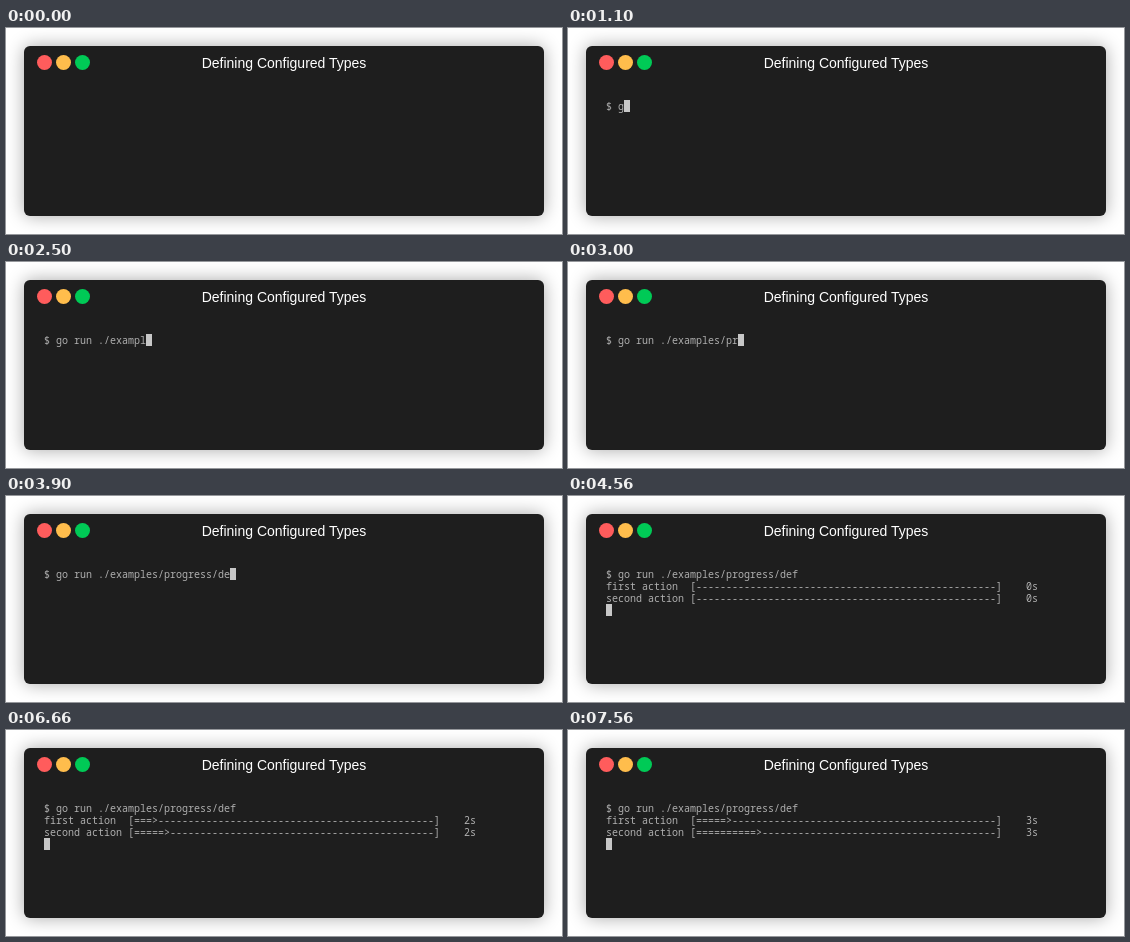
Animation of 556 by 206 pixels, one loop 8000 ms. Source, as an HTML page:

```html
<!DOCTYPE html>
<html lang="en">
<head>
<meta charset="utf-8">
<title>Terminal</title>
<style>
html, body { margin: 0; width: 100%; height: 100%; overflow: hidden; background: #fff; }
svg { display: block; width: 556px; height: 206px; }
.title { font: 14px "Liberation Sans", Arial, sans-serif; fill: #fff; text-anchor: middle; }
.line { font: 10px "Noto Sans Mono", "DejaVu Sans Mono", monospace; fill: #afafaf; white-space: pre; font-variant-ligatures: none; }
</style>
</head>
<body>
<svg viewBox="0 0 556 206">
  <defs>
    <filter id="blur" filterUnits="userSpaceOnUse" x="-30" y="-30" width="616" height="266" color-interpolation-filters="sRGB">
      <feGaussianBlur stdDeviation="9"/>
    </filter>
  </defs>
  <rect x="18" y="18" width="520" height="170" rx="6" fill="#000" opacity=".34" filter="url(#blur)"/>
  <rect x="18" y="18" width="520" height="170" rx="6" fill="#1e1e1e"/>
  <circle cx="38.5" cy="34.5" r="7.5" fill="#ff5c5c"/>
  <circle cx="57.5" cy="34.5" r="7.5" fill="#ffbd4c"/>
  <circle cx="76.5" cy="34.5" r="7.5" fill="#00ca56"/>
  <text class="title" x="278" y="40">Defining Configured Types</text>
  <text class="line" x="38" y="82"></text>
  <text class="line" x="38" y="94"></text>
  <text class="line" x="38" y="106"></text>
  <rect id="cursor" width="6" height="12" fill="#c7c7c7"/>
</svg>
<script>
const LOOP = 8000, CELL = 6, ROW = 12, LEFT = 38, TOP = 72, BAR = 50;
const COMMAND = "go run ./examples/progress/def";
const PAUSES = [1300, 1900, 3100];   // screen skips one refresh here
const PROMPT_AT = 100, ENTER_AT = 4100, BARS_AT = 4560;
const SECONDS = [5560, 6660, 7560];
const FIRST = [5860, 7360];
const SECOND = [5660, 6660, 7060, 7560];

const lines = [...document.querySelectorAll(".line")];
const cursor = document.getElementById("cursor");

const passed = (times, t) => times.filter(at => t >= at).length;

function typed(t) {
  const tick = Math.floor(t / 100) * 100;
  const shown = PAUSES.includes(tick) ? tick - 100 : tick;
  return COMMAND.slice(0, Math.max(0, (shown - 1000) / 100));
}

// Each step adds 5 % on top of an initial 1 %.
function bar(label, steps, t) {
  const full = Math.floor(BAR * (1 + 5 * passed(steps, t)) / 100);
  const done = full ? "=".repeat(full) + ">" : "";
  return `${label.padEnd(14)}[${done.padEnd(BAR, "-")}]    ${passed(SECONDS, t)}s`;
}

function draw(t) {
  const prompt = t < PROMPT_AT ? "" : "$ " + typed(t);
  const running = t >= BARS_AT;
  const text = [
    prompt,
    running ? bar("first action", FIRST, t) : "",
    running ? bar("second action", SECOND, t) : ""
  ];
  lines.forEach((line, i) => {
    if (line.textContent !== text[i]) line.textContent = text[i];
  });
  const row = running ? 3 : t >= ENTER_AT ? 1 : 0;
  cursor.setAttribute("x", LEFT + (row ? 0 : prompt.length * CELL));
  cursor.setAttribute("y", TOP + row * ROW);
  cursor.setAttribute("visibility", prompt ? "visible" : "hidden");
}

const start = performance.now();
function frame() {
  draw((performance.now() - start) % LOOP);
  requestAnimationFrame(frame);
}
draw(0);
requestAnimationFrame(frame);
</script>
</body>
</html>
```
